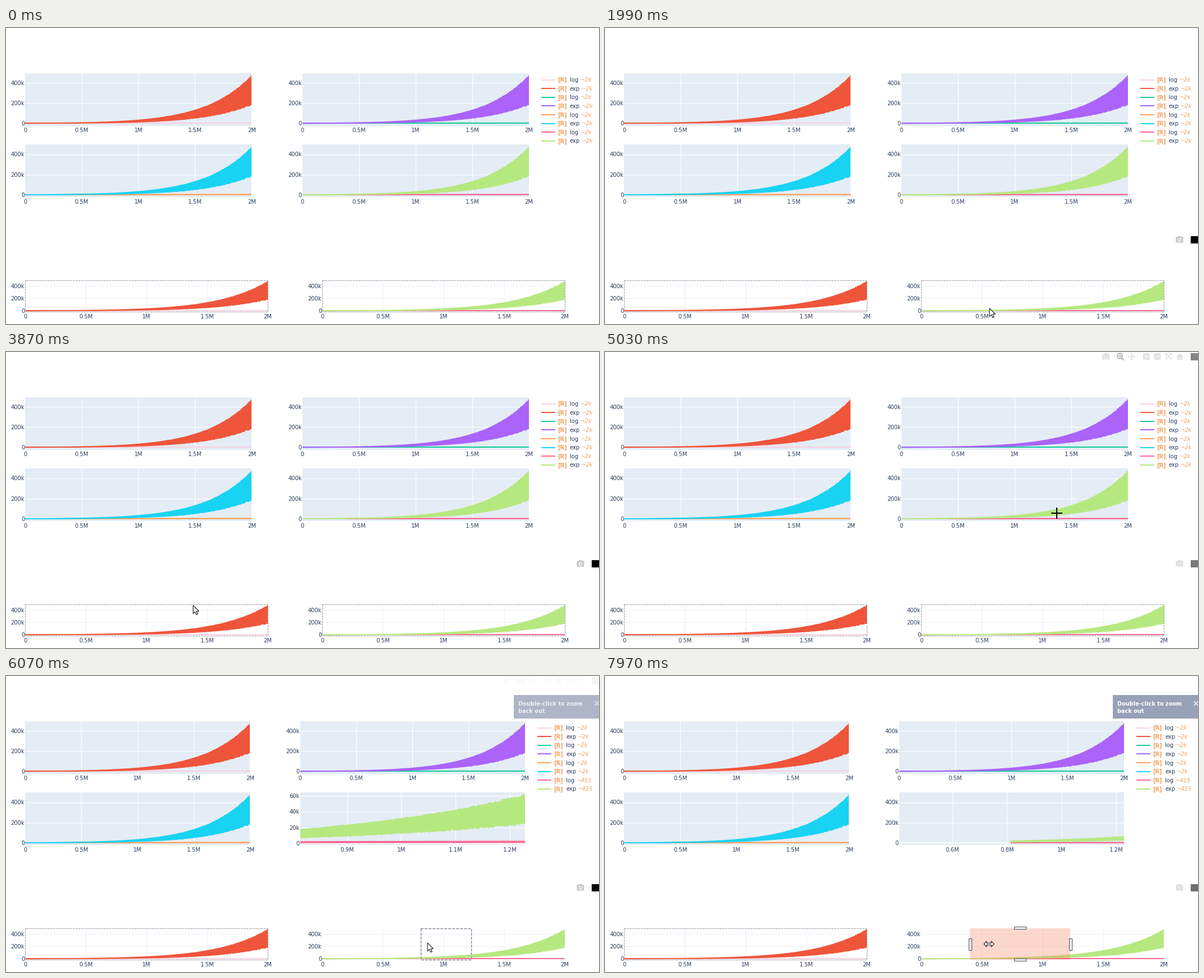
Write a matplotlib script that moves like this. It is 1058 by 529 pixels and loops after 8 s.

```python
import itertools

import matplotlib.pyplot as plt
import numpy as np
from matplotlib.animation import FuncAnimation
from matplotlib.lines import Line2D
from matplotlib.patches import Circle, FancyBboxPatch, Polygon, Rectangle

W, H, DPI = 1058, 529, 100
LOOP, STEP = 8000, 40
ZOOM_AT, GRAB_AT, RELEASE_AT = 5750, 7170, 7900
INK, ORANGE, PLOT_BG = "#2a3f5f", "#f4a261", "#e4ecf5"
PINK, RED, TEAL, PURPLE = "#fbd0e0", "#ef553b", "#12cb9a", "#ab63fa"
PEACH, CYAN, ROSE, LIME = "#ffa15a", "#19d3f3", "#ff6692", "#b6e880"

plt.rcParams["font.family"] = "DejaVu Sans"
fig = plt.figure(figsize=(W / DPI, H / DPI), dpi=DPI, facecolor="white")
ax = fig.add_axes([0, 0, 1, 1])
ax.set(xlim=(0, W), ylim=(H, 0))
ax.axis("off")
order = itertools.count(1)


def px(size):
    return size * 72 / DPI


def add(group, artist):
    artist.set_zorder(next(order))
    ax.add_artist(artist)
    group.append(artist)
    return artist


def text(group, x, y, s, ha="left", color=INK, size=10, **style):
    """Text whose digits are centred on y."""
    t = ax.text(x, y + 3.7, s, ha=ha, va="baseline", color=color,
                fontsize=px(size), zorder=next(order), **style)
    group.append(t)


def line(group, xs, ys, color, width=1.0, **style):
    return add(group, Line2D(xs, ys, color=color, lw=px(width),
                             solid_capstyle="butt", **style))


def rect(group, x0, y0, x1, y1, color, edge="none", width=0.0):
    return add(group, Rectangle((x0, y0), x1 - x0, y1 - y0, facecolor=color,
                                edgecolor=edge, lw=px(width)))


def poly(group, pts, color, edge="none", width=0.0):
    return add(group, Polygon(pts, closed=True, facecolor=color, edgecolor=edge,
                              lw=px(width), joinstyle="round"))


# --- Charts ---------------------------------------------------------------

def envelope(lo, hi, n, rate):
    """Extremes of a noisy sine growing as x * exp(rate * x), in thousands."""
    rng = np.random.default_rng(7)
    x = np.linspace(lo, hi, n)
    growth = x * np.exp(rate * x)
    upper = growth * (4.34 - 0.2 * rng.random(n))
    lower = growth * (1.66 + 0.2 * rng.random(n))
    return x, upper, lower


def panel(group, box, view, xticks, yticks, zero, per_k, colors,
          data=None, samples=1000, slider=False):
    x0, y0, x1, y1 = box
    grid = "#ebf0f8" if slider else "white"
    bg = rect(group, *box, "white" if slider else PLOT_BG)

    def sx(v):
        return x0 + (v - view[0]) / (view[1] - view[0]) * (x1 - x0)

    for v in xticks:
        if x0 + 2 < sx(v) < x1 - 2:
            line(group, [sx(v)] * 2, [y0, y1], grid)
        text(group, sx(v), y1 + 8.3, f"{v:g}M" if v else "0", ha="center")
    for v in yticks:
        y = zero - v * per_k
        line(group, [x0, x1], [y, y], grid, 1 if v else 2)
        text(group, x0 - 0.8, y, f"{v}k" if v else "0", ha="right")

    for color, rate in zip(colors, (-0.5, 2)):
        x, upper, lower = envelope(*(data or view), samples, rate)
        xs = np.concatenate([sx(x), sx(x[::-1])])
        ys = zero - per_k * np.concatenate([upper, lower[::-1]])
        trace = poly(group, np.column_stack([xs, ys]), color, color, 1.7)
        trace.set_clip_path(bg)


def dashed_box(group, x0, x1, color, width=1.0):
    xs, ys = [x0, x1, x1, x0, x0], np.take(SLIDE, [0, 0, 1, 1, 0])
    line(group, xs, ys, "#e0e2e6", width)
    line(group, xs, ys, color, width, linestyle=(0, (3, 2)))


FULL, HALVES, KS = (0, 2), (0, 0.5, 1, 1.5, 2), (0, 200, 400)
TOP, LOW, SLIDE = (80.5, 174.5), (208.2, 302.2), (450.5, 507)
ZOOM = (0.813, 1.228)


def full_panel(group, x0, x1, rows, colors):
    panel(group, (x0, rows[0], x1, rows[1]), FULL, HALVES, KS,
          rows[0] + 89.8, 0.181, colors)


def legend(group, x, last):
    colors = (PINK, RED, TEAL, PURPLE, PEACH, CYAN, ROSE, LIME)
    for i, color in enumerate(colors):
        y = 92.5 + 15.6 * i
        line(group, [x, x + 25], [y, y], color, 2)
        text(group, x + 29.5, y, "[R]", color=ORANGE, weight="bold")
        text(group, x + 51, y, ("log", "exp")[i % 2])
        text(group, x + 69.5 + 2 * (i % 2), y, last if i > 5 else "~2k",
             color=ORANGE, style="italic")


# Layers, each shown as a whole for part of the loop
base, before, after, zoomed, widened, marked, picked = ([] for _ in range(7))

for group, width, right, key_x, count in ((before, 404.3, 528.5, 955, "~2k"),
                                          (after, 401.3, 524.5, 948, "~415")):
    full_panel(group, 34, 34 + width, TOP, (PINK, RED))
    full_panel(group, right, right + width, TOP, (TEAL, PURPLE))
    full_panel(group, 34, 34 + width, LOW, (PEACH, CYAN))
    legend(group, key_x, count)
full_panel(before, 528.5, 932.8, LOW, (ROSE, LIME))

last = (524.5, LOW[0], 925.8, LOW[1])
panel(zoomed, last, ZOOM, (0.9, 1, 1.1, 1.2), (0, 20, 40, 60),
      299.3, 1.417, (ROSE, LIME), samples=207)
panel(widened, last, (0.404, ZOOM[1]), (0.6, 0.8, 1, 1.2), KS,
      298, 0.181, (ROSE, LIME), data=ZOOM, samples=207)

for x, colors in ((34, (PINK, RED)), (564, (ROSE, LIME))):
    panel(base, (x, SLIDE[0], x + 433, SLIDE[1]), FULL, HALVES, KS,
          505.3, 0.1112, colors, slider=True)
dashed_box(base, 34, 467, "#95959c")
dashed_box(before, 564, 997, "#95959c")
dashed_box(marked, 740, 830, "#7d8186", 1.4)


# --- Active selection and zoom shading -------------------------------------

def handle(group, x, y, w, h):
    return rect(group, x - w / 2, y - h / 2, x + w / 2, y + h / 2,
                "white", "#3c4250", 1)


area = rect(picked, 740, SLIDE[0], 830, SLIDE[1], (0.97, 0.5, 0.35, 0.3))
left_grip = handle(picked, 740, 479, 5, 21)
handle(picked, 830, 479, 5, 21)
mid_grips = [handle(picked, 785, y, 21, 4) for y in (450, 507)]

rubber = []
shade = rect(rubber, 528.5, LOW[0], 600, LOW[1], (0, 0, 0, 0.3))
rect(rubber, 776, LOW[0], 932.8, LOW[1], (0, 0, 0, 0.3))
bar = handle(rubber, 776, 255, 3, 30)
handle(rubber, 777.5, 255, 3, 30)


def move_selection(x0):
    area.set_x(x0)
    area.set_width(830 - x0)
    left_grip.set_x(x0 - 2.5)
    for grip in mid_grips:
        grip.set_x((x0 + 830) / 2 - 10.5)


# --- Toolbars and hint ------------------------------------------------------

GREY, ACTIVE = "#c7c7c7", "#7c7c7c"
top_bar, low_bar, hint = [], [], []


def tile(group, x, y, w, h):
    add(group, FancyBboxPatch((x - w / 2, y - h / 2), w, h, facecolor=GREY,
                              boxstyle="round,pad=1,rounding_size=1",
                              edgecolor="none"))


def camera(group, x, y):
    tile(group, x, y + 0.5, 11, 8)
    rect(group, x - 3, y - 6, x + 3, y - 3, GREY)
    for r, color in ((3.2, "white"), (1.8, GREY)):
        add(group, Circle((x, y + 0.5), r, facecolor=color))


def square(group, x, y):
    rect(group, x - 6, y - 6.5, x + 7, y + 6.5, "black")


def plus(group, x, y, r, color, width, upright=True):
    line(group, [x - r, x + r], [y, y], color, width)
    if upright:
        line(group, [x, x], [y - r, y + r], color, width)


def magnifier(group, x, y):
    add(group, Circle((x - 0.5, y - 1), 4.5, facecolor="white",
                      edgecolor=ACTIVE, lw=px(2.4)))
    line(group, [x + 2.5, x + 6.5], [y + 2.5, y + 6.5], ACTIVE, 3)
    plus(group, x - 0.5, y - 1, 2.5, ACTIVE, 1.5)


def arrows(group, x, y, turn, reach):
    for a in turn + np.arange(4) * np.pi / 2:
        d = np.array([np.cos(a), np.sin(a)])
        side = 2.8 * np.array([-d[1], d[0]])
        center = np.array([x, y])
        neck = center + d * (reach - 3)
        line(group, *zip(center, neck), GREY, 1.6)
        poly(group, [center + d * reach, neck + side, neck - side], GREY)


def house(group, x, y):
    poly(group, [(x - 6.5, y + 0.5), (x, y - 6), (x + 6.5, y + 0.5)], GREY)
    rect(group, x - 4.5, y, x + 4.5, y + 5.5, GREY)
    rect(group, x - 1.2, y + 2, x + 1.2, y + 5.5, "white")


camera(top_bar, 893.5, 8)
magnifier(top_bar, 919, 8)
arrows(top_bar, 939.5, 8, 0, 6.8)
for x, upright in ((966, True), (985.5, False)):
    tile(top_bar, x, 8, 10, 10)
    plus(top_bar, x, 8, 3.5, "white", 2, upright)
arrows(top_bar, 1005.5, 8, np.pi / 4, 8)
house(top_bar, 1025.5, 8)
square(top_bar, 1051, 8)
camera(low_bar, 1025, 378)
square(low_bar, 1051, 378)

rect(hint, 906, 34, W, 76, "#97a1b7")
for y, words in ((49, "Double-click to zoom"), (62, "back out")):
    text(hint, 914, y, words, color="white", size=9.8, weight="bold")
text(hint, 1053, 50.5, "×", ha="center", color="#e8ebf0", size=15, weight="bold")


# --- Pointer ----------------------------------------------------------------

cross, arrow, resize = [], [], []
cross_h = line(cross, [0, 0], [0, 0], "black", 2)
cross_v = line(cross, [0, 0], [0, 0], "black", 2)
ARROW = np.array([(0, 0), (0, 14.5), (3.3, 11.5), (5.7, 16.6),
                  (8.1, 15.5), (5.8, 10.6), (10.3, 10.3)])
HALF = np.array([(-9, 0), (-4, -5), (-4, -1.5)])
RESIZE = np.vstack([HALF, HALF[::-1] * (-1, 1), -HALF, HALF[::-1] * (1, -1)])
arrow_shape = poly(arrow, ARROW, "white", "black", 1)
resize_shape = poly(resize, RESIZE, "white", "black", 1)

# Strokes of the hand: start, end and evenly timed waypoints
STROKES = (
    (420, 1210, [(690, 528), (640, 340), (750, 252), (830, 250), (897, 246)]),
    (1240, 1990, [(897, 246), (828, 283), (690, 296), (688, 420), (686, 501)]),
    (2050, 2810, [(686, 501), (610, 250), (326, 165)]),
    (2870, 3170, [(326, 165), (250, 95), (608, 203)]),
    (3370, 4150, [(608, 203), (437, 133), (350, 380), (333, 430), (334, 457),
                  (320, 475), (300, 485)]),
    (4180, 4490, [(300, 485), (345, 490), (410, 432)]),
    (4650, 5030, [(410, 432), (600, 420), (740, 385), (806, 288)]),
    (5130, 5560, [(776, 270), (692, 255)]),
    (5650, 6060, [(692, 255), (752, 477)]),
    (6270, 6720, [(752, 477), (800, 472), (741, 479)]),
    (7650, 7890, [(739, 479), (651, 479)]),
    (7970, 7970, [(685, 479)]),
)
TIMES = np.concatenate([np.linspace(a, b, len(p)) for a, b, p in STROKES])
POINTS = np.concatenate([p for _, _, p in STROKES])


def pointer(t):
    return np.interp(t, TIMES, POINTS[:, 0]), np.interp(t, TIMES, POINTS[:, 1])


def hover_alphas(t, fade_time=220):
    """Each toolbar fades in while the pointer is over its half of the page."""
    past = np.linspace(t - fade_time, t, 23)
    y = pointer(past)[1]
    present = past > 420
    top = present & (y < 365)
    low = present & (y >= 365) & (past < RELEASE_AT)
    return top.mean(), low.mean()


def over_plot(x, y):
    return ((34 < x < 438 or 528 < x < 933)
            and any(r[0] < y < r[1] for r in (TOP, LOW)))


def show(group, on):
    for a in group:
        a.set_visible(on)


def fade(group, alpha):
    show(group, alpha > 0.01)
    for a in group:
        a.set_alpha(alpha)


def update(i):
    t = i * STEP + 30
    x, y = pointer(t)

    show(before, t < ZOOM_AT)
    show(after, t >= ZOOM_AT)
    show(zoomed, ZOOM_AT <= t < RELEASE_AT)
    show(widened, t >= RELEASE_AT)
    show(marked, ZOOM_AT <= t < GRAB_AT)
    show(picked, t >= GRAB_AT)
    move_selection(np.interp(t, (7650, 7890), (740, 651)))

    show(rubber, 5150 < t < 5690)
    shade.set_width(x - 528.5)
    bar.set_x(x - 3)

    top, low = hover_alphas(t)
    fade(top_bar, top)
    fade(low_bar, low)
    fade(hint, np.clip((t - 5800) / 340, 0, 0.79 if t < 6270 else 1))

    present, grabbing = t > 420, t >= GRAB_AT
    crossing = over_plot(x, y)
    show(cross, present and crossing)
    show(arrow, present and not crossing and not grabbing)
    show(resize, grabbing)
    cross_h.set_data([x - 10, x + 10], [y, y])
    cross_v.set_data([x, x], [y - 10, y + 10])
    arrow_shape.set_xy(ARROW + (x, y))
    resize_shape.set_xy(RESIZE + (x, y))
    return []


anim = FuncAnimation(fig, update, frames=LOOP // STEP, interval=STEP,
                     init_func=lambda: update(0), repeat=True, repeat_delay=0,
                     blit=False)
plt.show()
```
